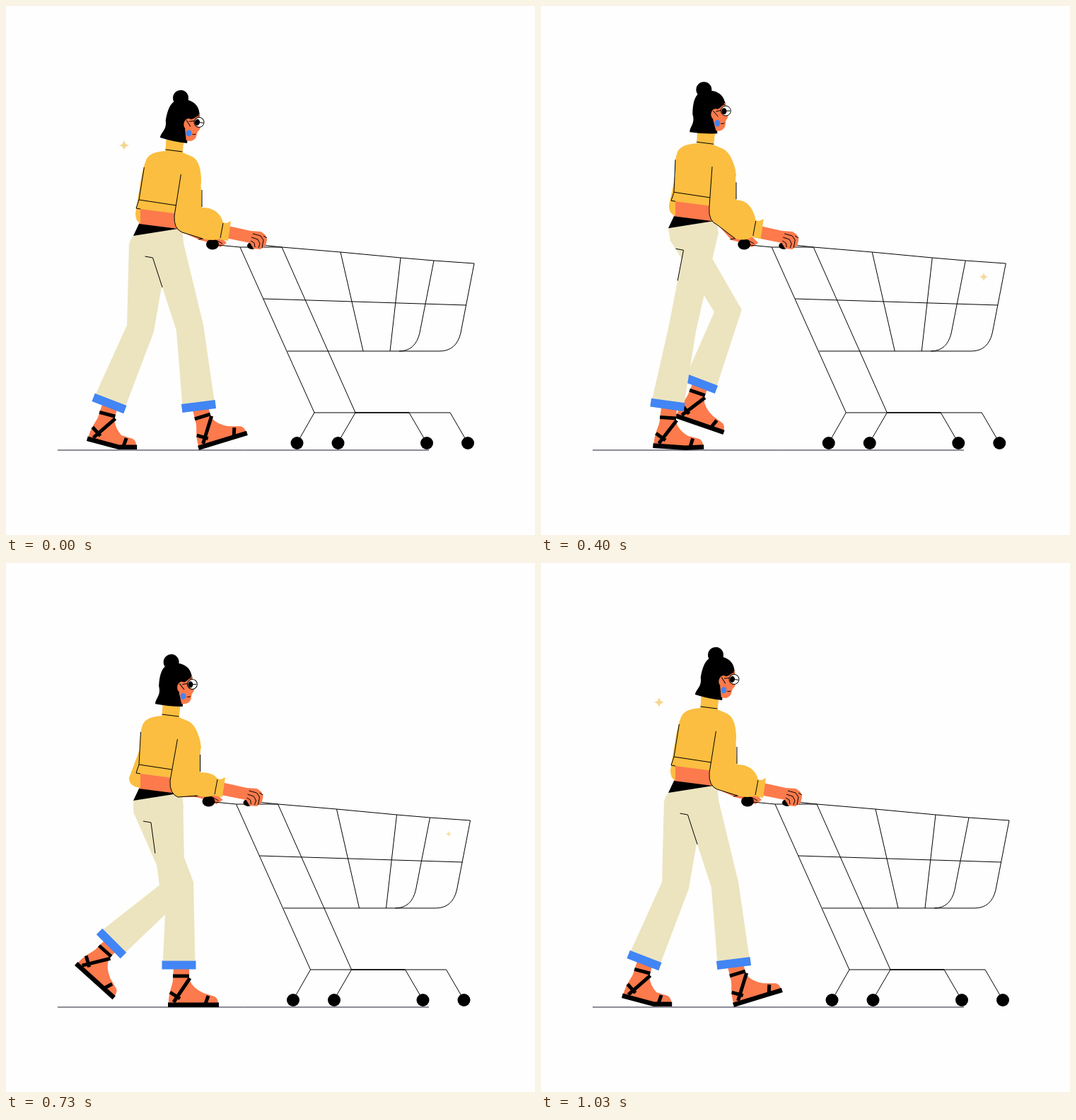
Write an HTML page with a canvas that moves like this. It is 748 px wide and 748 px high and loops after 1.06 s.

```html
<!DOCTYPE html>
<html lang="en">
<head>
<meta charset="utf-8">
<title>Shopping walk</title>
<style>
  html, body { margin: 0; width: 100%; height: 100%; overflow: hidden; background: #fefefe; }
  canvas { display: block; }
</style>
</head>
<body>
<canvas id="stage" width="748" height="748"></canvas>
<script>
const ctx = document.getElementById('stage').getContext('2d');
const LOOP = 1060, STEP = 100 / 3, CYCLE = 31;
const BG = '#fefefe', INK = '#000', SKIN = '#fc7a4c', SHIRT = '#fbbe40',
      PANTS = '#ece4bf', BLUE = '#4285f4', STAR = '#f3cf7c';

// step, waist y, head x, head tilt, near elbow x, far elbow x, wrist dx, wrist y, cart dx
const BODY = [
  [0, 325, 236.5, 9, 238, 183, 0, 306, 0],
  [5, 336, 232, 7, 236, 179, -3, 306, -1],
  [8, 321, 228, 2, 238, 181, -2, 303, -3],
  [11.5, 314, 229, 0, 238, 181, -3, 303, -4.5],
  [16, 324, 234, 0, 233, 178, -6, 304, -6.5],
  [22, 336, 230, 2.5, 232, 174, -8, 305, -5.5],
  [26, 317, 230, 4, 240, 183, -1, 303, -2],
  [28.5, 315, 233, 7, 240, 184, 0, 304, -0.5]
];
// step, knee x y, cuff x y angle, heel x y angle, toe bend
const NEAR_LEG = [
  [0, 260, 455, 272.5, 566, -7, 273, 628, -17, 0],
  [5, 276, 457, 258.5, 568, 8, 241, 628, 0, 0],
  [8, 220, 460, 210.5, 566.5, 4, 195, 628, 0, 0],
  [16, 192, 450, 156, 560, 17, 125, 617, 13, -13],
  [20, 222, 461, 139, 545, 42, 85, 575, 44, -5],
  [22, 235, 463, 149, 538, 45, 97, 569, 42, 0],
  [23.7, 256, 447, 174, 519, 41, 124, 552, 40, 0],
  [26, 273, 431, 215, 529, 30, 174, 575, 27, 0]
];
const FAR_LEG = [
  [0, 190, 456, 146, 562, 21, 114, 615, 15, -15],
  [5, 217, 460, 138, 542, 41, 87, 574, 46, 0],
  [8, 250, 432, 171, 515, 40, 121, 549, 41, 0],
  [11, 266, 430, 212, 528, 28, 168, 573, 27, 0],
  [16, 251, 446, 267, 558.5, -9.5, 266, 620, -14.5, 0],
  [18, 258, 452, 266, 564, -4, 260, 627, -6, 0],
  [22, 246, 455, 244.5, 568.5, 0, 229, 628, 0, 0],
  [26, 199, 455, 193.5, 561, 0, 178, 626, 1, 0]
];

// Cyclic monotone cubic interpolation of every column
function pose(keys, f) {
  f %= CYCLE;
  const n = keys.length;
  const at = i => {
    const turn = Math.floor(i / n), k = keys[i - turn * n];
    return [k[0] + turn * CYCLE, k];
  };
  let i = n - 1;
  while (keys[i][0] > f) i--;
  const [p, q, r, s] = [i - 1, i, i + 1, i + 2].map(at);
  const h = r[0] - q[0], u = (f - q[0]) / h;
  const tangent = (a, b) => a * b <= 0 ? 0 : 2 * a * b / (a + b);
  return q[1].slice(1).map((v, j) => {
    const c = j + 1, w = r[1][c];
    const d = (w - v) / h;
    const m0 = tangent((v - p[1][c]) / (q[0] - p[0]), d);
    const m1 = tangent(d, (s[1][c] - w) / (s[0] - r[0]));
    const a = u * u * (3 - 2 * u);
    return v + (w - v) * a + h * u * (1 - u) * (m0 * (1 - u) - m1 * u);
  });
}

const rad = deg => deg * Math.PI / 180;

function fill(d, color) {
  ctx.fillStyle = color;
  ctx.fill(new Path2D(d));
}
function line(d, width = 1, color = INK) {
  ctx.strokeStyle = color;
  ctx.lineWidth = width;
  ctx.stroke(new Path2D(d));
}
function oval(x, y, rx, ry = rx, color = INK) {
  ctx.beginPath();
  ctx.ellipse(x, y, rx, ry, 0, 0, 7);
  ctx.fillStyle = color;
  ctx.fill();
}
function poly(points, color) {
  fill('M' + points.map(p => p.join()).join('L') + 'Z', color);
}
function group(x, y, deg, draw) {
  ctx.save();
  ctx.translate(x, y);
  ctx.rotate(rad(deg));
  draw();
  ctx.restore();
}

function foot(x, y, deg, bend) {
  const c = Math.cos(rad(bend)), s = Math.sin(rad(bend));
  const p = (px, py) => {
    if (px <= 46) return `${px} ${py} `;
    const dx = px - 46, dy = py + 3;
    return `${46 + dx * c - dy * s} ${-3 + dx * s + dy * c} `;
  };
  group(x, y, deg, () => {
    fill(`M1 -5C1 -24 7 -30 7 -40L8 -57H30V-39Q35 -27 ${p(50, -20)}L${p(66, -15)}Q${p(71, -12)}${p(71, -5)}L46 -4Z`, SKIN);
    line('M7 -44L30 -44M31 -41L8 -7M3 -21L17 -12', 5);
    line(`M${p(57, -16)}L${p(53, -5)}`, 5);
    line(`M0 -3.3L46 -3.3L${p(72, -3.3)}`, 6.6);
  });
}

function leg(l, left, right) {
  const [kx, ky, cx, cy, ca, hx, hy, ha, bend] = l;
  foot(hx, hy, ha, bend);
  const mx = (left[0] + right[0]) / 2, my = (left[1] + right[1]) / 2;
  const thigh = Math.atan2(ky - my, kx - mx), shin = Math.atan2(cy - ky, cx - kx);
  const a = (thigh + shin) / 2 - Math.PI / 2;
  const nx = 19.5 * Math.cos(a), ny = 19.5 * Math.sin(a);
  const ex = 23 * Math.cos(rad(ca)), ey = 23 * Math.sin(rad(ca));
  const knee = [kx - nx, ky - ny];
  poly([left, knee, [cx - ex, cy - ey], [cx + ex, cy + ey], [kx + nx, ky + ny], right], PANTS);
  group(cx, cy, ca, () => fill('M-24 -6H24V6H-24Z', BLUE));
  return knee;
}

function lowerBody(b, near, far) {
  const farL = 178 + (far[0] - 225) * 0.12, nearL = 204 + (near[0] - 225) * 0.1;
  leg(far, [farL, b + 17], [229, b + 20]);
  const hip = [nearL, b + 31];
  const knee = leg(near, hip, [250.5, b + 8]);
  fill(`M180 ${b}Q${farL - 1} ${b + 9} ${farL} ${b + 18}L204 ${b + 45}L225 ${b + 45}L251 ${b + 9}L249 ${b - 12}L242 ${b - 11}Z`, PANTS);
  const k = 44 / Math.hypot(knee[0] - hip[0], knee[1] - hip[1]);
  line(`M${nearL - 11} ${b + 29}L${hip}L${nearL + (knee[0] - hip[0]) * k} ${b + 31 + (knee[1] - hip[1]) * k}`);
  fill(`M190 ${b - 42}L246 ${b - 36}V${b - 9}L188 ${b - 16}Z`, SKIN);
  fill(`M188 ${b - 17}L243 ${b - 10}L180 ${b}Z`, INK);
}

function cart() {
  line('M300 338L331 341H390M362 338L390 341L473 348L558 356L605 360L662 364L643 462Q637 488 613 488H398' +
    'M331 341L436 575L411.5 618M390 341L494 575L469 618M364 414L651 423' +
    'M473 348L505 488M558 356L543 488M605 360L585 462Q579 488 556 488' +
    'M570 575L595 618M436 575H628L653 618');
  line('M494 575H570', 1.4);
  for (const x of [411.5, 469.5, 595, 653]) oval(x, 618, 9);
  oval(292, 337, 9, 7.5);
  oval(348, 339, 7, 5);
}

function farArm(b, dx) {
  fill(`M246 ${b - 14}L${280 + dx} 322L${304 + dx} 327L${312 + dx} 335L${303 + dx} 341L${286 + dx} 334L${274 + dx} 331L250 ${b - 5}Z`, SKIN);
  line(`M${272 + dx} 330L${284 + dx} 328L${297 + dx} 331L${306 + dx} 336`);
}

function torso(b, s, elbow) {
  group(0, b, 0, () => {
    fill(`M${225 + s} -120Q${203 + s} -119 ${198 + s} -108Q${193 + s} -96 190 -75L${elbow} -32Q${elbow} -20 190 -18V-38L244 -31H262L276 -75Q${276 + s} -105 ${263 + s} -112L${249 + s} -118Z`, SHIRT);
    line(`M${195 + s} -97L188 -51L184 -39L190 -38M188 -51L241 -43`);
    fill(`M${226 + s} -136L${251 + s} -134L${249 + s} -116L${225 + s} -118Z`, SHIRT);
    line(`M${225 + s} -122L${249 + s} -119`);
  });
}

function head(x, y, tilt, blink) {
  group(x, y, tilt, () => {
    oval(1, -61, 11);
    fill('M-19 -1C-19 -9 -11 -13 -15 -26C-15 -35 -14 -48 -8 -54C1 -63 23 -62 29 -48L32 -40L18 -28L20 1Q0 2 -19 -1Z', INK);
    fill('M31 -43L34 -31L35 -22L32 -17L31 -9Q27 -1 18 -3L14 -18L15 -31Q25 -34 31 -43Z', SKIN);
    oval(17.5, -26, 6.5, 8, SKIN);
    line('M14 -31L21 -23M18 -30L26 -32M26 -39L31 -40');
    line('M25 -13Q28 -12 30 -14');
    oval(20, -13.5, 4, 4.5, BLUE);
    if (blink) {
      line('M25 -31L36 -30');
    } else {
      oval(32, -31, 6.5, 6.5, '#fff');
      oval(29.5, -30.5, 3.6, 4.6);
      line('M32 -31H38');
    }
    ctx.beginPath();
    ctx.arc(32, -31, 7, 0, 7);
    ctx.stroke();
  });
}

function nearArm(b, s, ax, wx, wy, dx) {
  // hand
  group(dx, 0, 0, () => {
    fill('M310 310L346 318L360 319Q369 323 369 331L367 339L360 344L350 343L345 335L310 328Z', SKIN);
    line('M349 322L360 325L364 331L362 342M347 327L356 330L359 336L357 342M346 332L351 335L352 341M364 325L369 328');
  });
  // sleeve
  const x = 306 + wx;
  const under = `${ax} ${b - 28}Q${ax - 1} ${b - 10} ${ax + 11} ${b - 5}`;
  fill(`M${247 + s} ${b - 112}Q${274 + s} ${b - 110} 275 ${b - 82}L${277 + wx * 0.3} ${b - 40}Q${x - 5} ${b - 40} ${x + 1} ${wy}L${x - 4} ${wy + 23}Q${x - 12} 333 ${x - 28} 329L${ax + 11} ${b - 5}Q${ax - 1} ${b - 10} ${ax} ${b - 28}L${247 + s} ${b - 87}Z`, SHIRT);
  line(`M${247 + s} ${b - 87}L${under}L${x - 28} 329`);
  line(`M${277 + wx * 0.3} ${b - 65}V${b - 41}`);
  poly([[x, wy], [x + 6, wy + 1], [x + 12, wy - 2], [x + 8, wy + 26], [x - 4, wy + 24]], SHIRT);
  line(`M${x + 1} ${wy + 1}L${x - 3} ${wy + 22}`);
}

function sparkle(x, y, f, start) {
  const u = ((f - start + CYCLE) % CYCLE) / 20.7;
  if (u >= 1) return;
  const size = 7.5 * Math.sin(Math.PI * u), q = size * 0.12;
  ctx.globalAlpha = 0.35 + 0.5 * Math.sin(Math.PI * u);
  group(x, y, 0, () => fill(
    `M0 ${-size}Q${q} ${-q} ${size} 0Q${q} ${q} 0 ${size}Q${-q} ${q} ${-size} 0Q${-q} ${-q} 0 ${-size}Z`, STAR));
  ctx.globalAlpha = 1;
}

function draw(f) {
  const [b, hx, tilt, ax, ex, wx, wy, dx] = pose(BODY, f);
  const s = (hx - 236) * 0.75;
  ctx.fillStyle = BG;
  ctx.fillRect(0, 0, 748, 748);
  line('M73 628H598', 1, '#1c1c30');
  sparkle(167, 197, f, 21.5);
  sparkle(626, 383, f, 5.6);
  lowerBody(b, pose(NEAR_LEG, f), pose(FAR_LEG, f));
  farArm(b, dx);
  group(dx, 0, 0, cart);
  torso(b, s, ex);
  head(hx, b - 135, tilt, f >= 7 && f < 10);
  nearArm(b, s, ax, wx, wy, dx);
}

function tick() {
  const t = performance.now() % LOOP;
  draw(Math.min(CYCLE, Math.floor((t + 5) / STEP)));
  requestAnimationFrame(tick);
}
tick();
</script>
</body>
</html>
```
